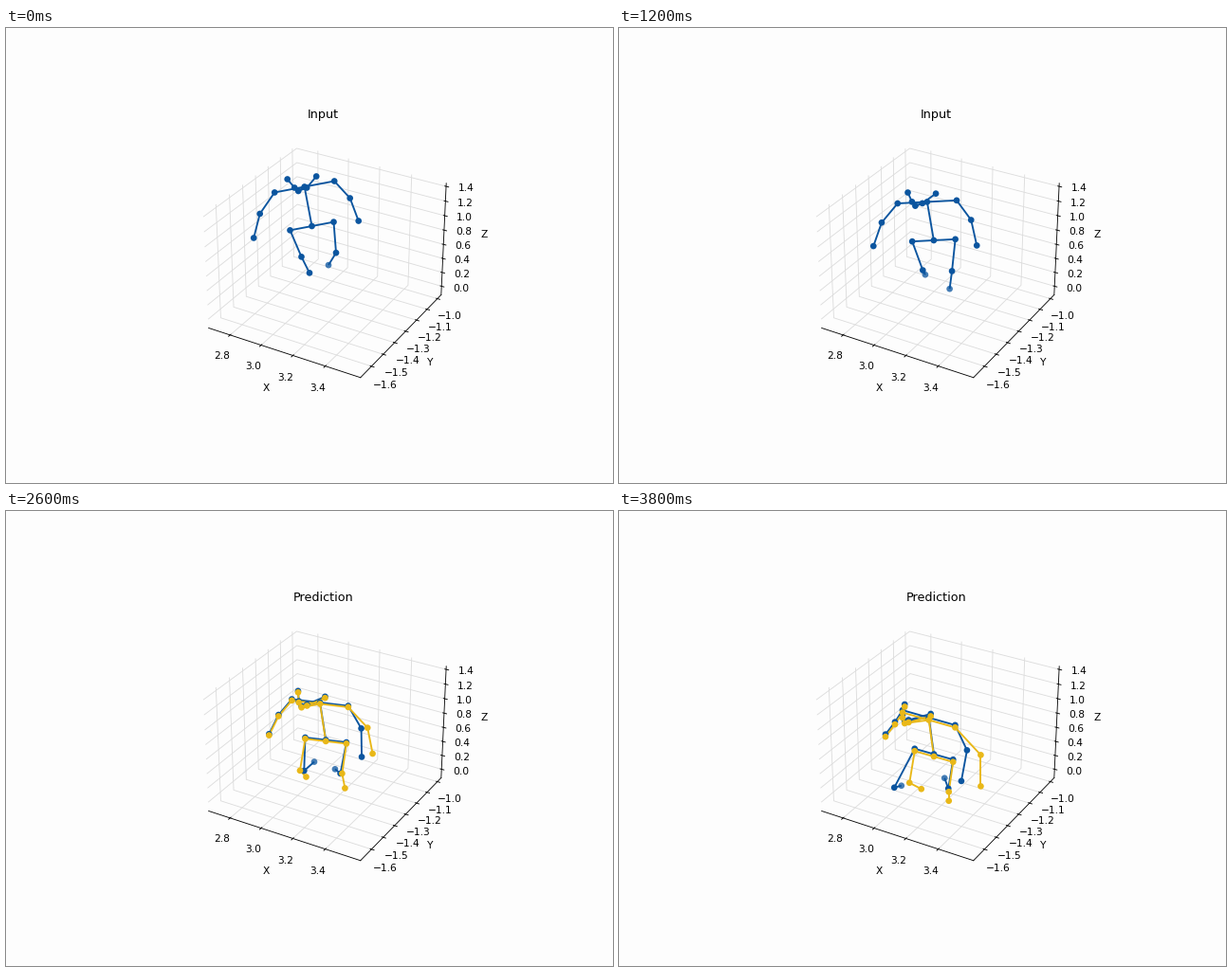
A matplotlib script for the animation above (4 s loop, 640 by 480 pixels).

```python
import numpy as np
import matplotlib.pyplot as plt
from matplotlib.animation import FuncAnimation
from matplotlib.collections import LineCollection
from matplotlib.colors import to_rgb

W, H, DPI = 640, 480, 80
FRAMES, INTERVAL, SPLIT = 20, 200, 10
BLUE, YELLOW, PAPER = "#0b559f", "#e9b818", "#fdfdfd"

plt.rcParams.update({
    "font.family": "DejaVu Sans", "font.size": 9.6,
    "grid.color": "#dcdcdc", "grid.linewidth": 0.77,
    "axes.linewidth": 0.77, "axes.titlepad": 5.8,
})

# joint: (parent, offsets in pixels that the bone glides through);
# a single number is a half-width along the turning body
RIG = {
    "neck": ("pelvis", [(-7.8, -41.5), (-5.3, -38.5)]),
    "nose": ("neck", [(-6.5, 4.5), (-25.5, 3.5)]),
    "eye L": ("nose", [(-4, -3.5), (-2.3, -6)]),
    "ear L": ("eye L", [(-7.5, -9), (2.3, -11.5)]),
    "eye R": ("nose", [(9, -3.5), (4.2, -1)]),
    "ear R": ("eye R", [(10, -12), (23.3, -6.5)]),
    "shoulder L": ("neck", -31.5),
    "elbow L": ("shoulder L", [(-15.5, 22.5), (-16, 18.5), (-8, 12.5)]),
    "hand L": ("elbow L", [(-6.5, 25.5), (-9.5, 23), (-10, 13)]),
    "shoulder R": ("neck", 31.5),
    "elbow R": ("shoulder R", [(16.5, 18), (12.5, 26.5)]),
    "hand R": ("elbow R", [(9, 24), (3.5, 28.5), (-6, 32.5)]),
    "hip L": ("pelvis", -23),
    "knee L": ("hip L", [(12, 28), (6.5, 32.5), (-21.5, 41)]),
    "foot L": ("knee L", [(8.5, 17), (3, 6), (5, -1), (12.5, -12), (7.5, -2)]),
    "hip R": ("pelvis", 23),
    "knee R": ("hip R", [(2.5, 32.5), (-5.5, 33.5), (-5, 30.5)]),
    "foot R": ("knee R", [(-8, 13), (-2.5, 18), (-5.5, -3.5), (-4, -11)]),
}

# The prediction keeps its legs stiffer and the right arm wider
GUESS_RIG = RIG | {
    "elbow R": ("shoulder R", [(6, 6), (27, 29)]),
    "hand R": ("elbow R", [(17, 15), (0, 33)]),
    "knee L": ("hip L", [(-5.5, 33.5)]),
    "foot L": ("knee L", [(-6.5, 7), (12.5, 6.5)]),
    "knee R": ("hip R", [(-4.5, 31.5)]),
    "foot R": ("knee R", [(9.5, 28.5), (0, 9.5)]),
}

JOINTS = ["pelvis", *RIG]
BONES = np.array([(JOINTS.index(j), JOINTS.index(p))
                  for j, (p, _) in RIG.items()])
FEET = [JOINTS.index("foot L"), JOINTS.index("foot R")]


def glide(s, keys):
    """Polynomial path through evenly spaced keys, s from 0 to 1."""
    n = len(keys)
    coef = np.polyfit(np.linspace(0, 1, n), keys, n - 1)
    return (np.vander([s], n) @ coef)[0]


def pose(rig, i, shift=(0, 0)):
    s = i / (FRAMES - 1)
    across = np.array([1 - 0.12 * s * s, 0.44 * s - 0.19])
    at = {"pelvis": np.array([322 + 32 * s - 22.5 * s**3, 208.5 + 47.5 * s])
          + shift}
    for joint, (parent, bone) in rig.items():
        offset = glide(s, bone) if isinstance(bone, list) else bone * across
        at[joint] = at[parent] + offset
    return np.array([at[j] for j in JOINTS])


def drift(i):
    """Jitter and sag that build up once the prediction runs."""
    grow = min(1, (i - SPLIT) / 4)
    return (3.5 * grow * np.cos(2 * np.pi * (i - 13.75) / 3), 4.5 * grow - 2)


fig = plt.figure(figsize=(W / DPI, H / DPI), dpi=DPI, facecolor=PAPER)

side = 285
ax = fig.add_axes((192.15 / W, 93.25 / H, side / W, side / H), projection="3d")
ax.patch.set_visible(False)
ax.view_init(30, -60)
ax.set_xticks(np.linspace(2.8, 3.4, 4))
ax.set_yticks(np.linspace(-1.6, -1.0, 7))
ax.set_zticks(np.linspace(0, 1.4, 8))
ax.set(xlim=(2.659, 3.612), ylim=(-1.692, -0.963), zlim=(-0.126, 1.442))
ax.set_xlabel("X", labelpad=3)
ax.set_ylabel("Y", labelpad=3)
ax.set_zlabel("Z", labelpad=3)
ax.tick_params(pad=3.5)
for axis in (ax.xaxis, ax.yaxis, ax.zaxis):
    axis.set_pane_color((1, 1, 1, 0))
    axis.pane.set_edgecolor("#ebebeb")
title = ax.set_title("Input", y=1.0)
title.set_y(1.0)  # 3D axes lower the requested height

# Pixel stage, whole numbers at pixel centres
stage = fig.add_axes((0, 0, 1, 1))
stage.set_xlim(-0.5, W - 0.5)
stage.set_ylim(H - 0.5, -0.5)
stage.axis("off")


class Skeleton:
    def __init__(self, color, z):
        n = len(JOINTS)
        self.rgba = np.tile([*to_rgb(color), 1.0], (n, 1))
        self.bones = LineCollection([], colors=color, linewidths=1.7, zorder=z)
        stage.add_collection(self.bones, autolim=False)
        self.dots = stage.scatter([0] * n, [0] * n, s=36, linewidths=0)

    def show(self, points, z, fade=1):
        self.bones.set_segments(list(points[BONES]))
        self.dots.set_offsets(points)
        self.rgba[FEET, 3] = fade
        self.dots.set_facecolors(self.rgba)
        self.dots.set_zorder(z)

    def set_visible(self, on):
        self.bones.set_visible(on)
        self.dots.set_visible(on)


body = Skeleton(BLUE, 2)
ghost = Skeleton(YELLOW, 3)


def draw(i):
    predicting = i >= SPLIT
    title.set_text("Prediction" if predicting else "Input")
    # the feet lie deeper in the scene and fade a little
    body.show(pose(RIG, i), 5, (max(0.76, 1 - 0.06 * i), 0.76))
    ghost.set_visible(predicting)
    if predicting:
        # the prediction drifts towards the viewer
        ghost.show(pose(GUESS_RIG, i, drift(i)), 4 + (i - SPLIT) / 2)
    return []


anim = FuncAnimation(fig, draw, frames=FRAMES, interval=INTERVAL,
                     init_func=lambda: draw(0), repeat=True, repeat_delay=0,
                     blit=False)
plt.show()
```
